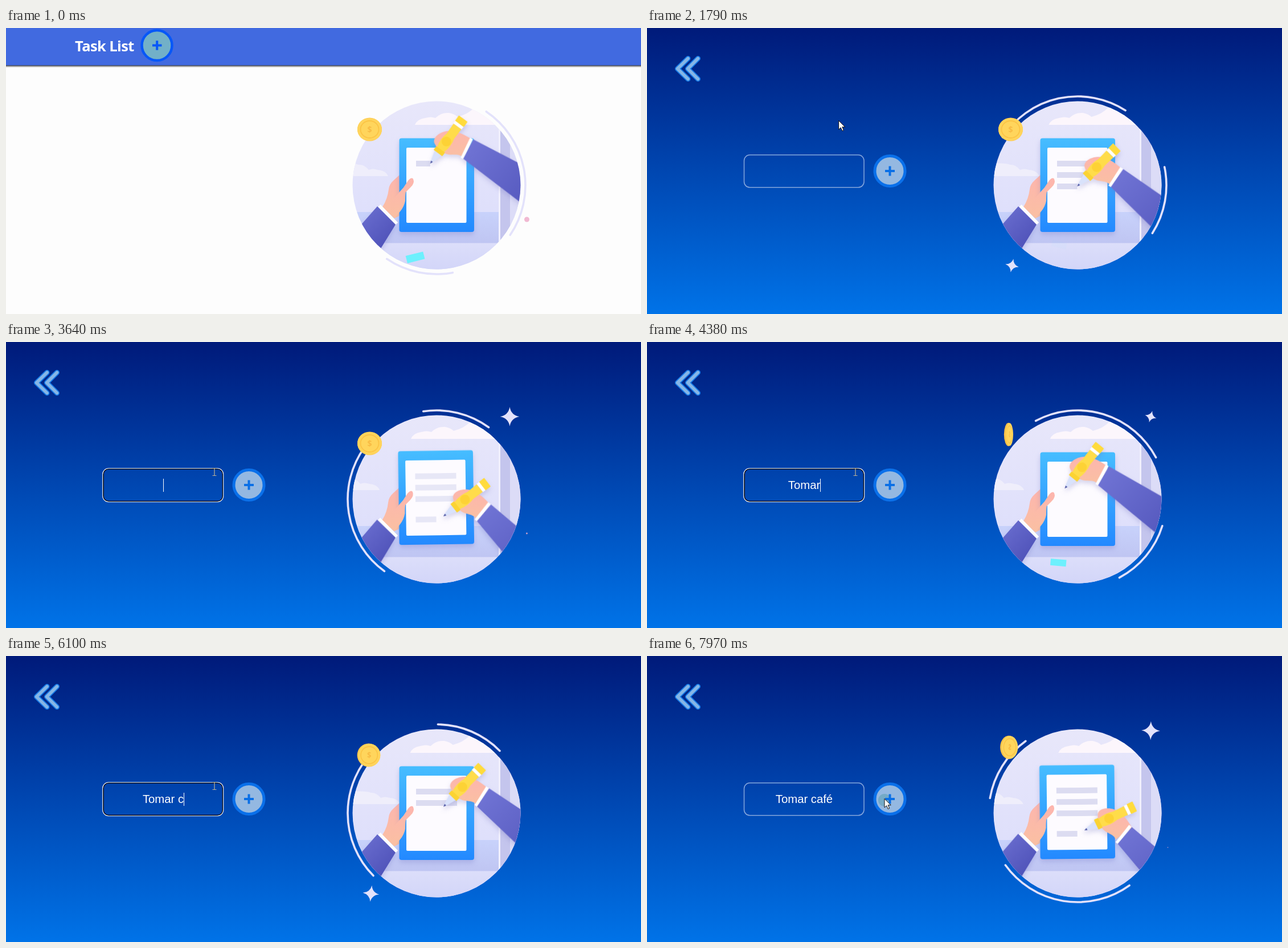
These frames come from a looping animation (1115x502 px, 8 s). An HTML page:

```html
<!DOCTYPE html>
<html lang="en">
<head>
<meta charset="utf-8">
<title>Task List</title>
<style>
html, body { margin: 0; width: 100%; height: 100%; overflow: hidden; background: #fdfdfd; }
svg { position: absolute; left: 0; top: 0; display: block; }
#entry {
  position: absolute; left: 170px; top: 222px; width: 212px; height: 58px;
  display: flex; align-items: center; justify-content: center;
  font: 20.3px "Liberation Sans", Arial, sans-serif; color: #fff; white-space: pre;
}
#typed { position: relative; height: 23px; line-height: 23px; }
#caret { position: absolute; right: -1px; top: 0; width: 1px; height: 23px; background: #fff; }
.title { font: 700 25.5px "Open Sans", "Noto Sans", sans-serif; letter-spacing: -.6px; fill: #fff; }
.coin-sign { font: 700 14px "Open Sans", sans-serif; fill: #f8bb44; text-anchor: middle; }
.ring { fill: none; stroke: #e3e2fb; stroke-width: 3.6; stroke-linecap: round; }
.soft { filter: drop-shadow(0 5px 4px rgba(110, 110, 190, .28)); }
</style>
</head>
<body>
<svg width="1115" height="502" viewBox="0 0 1115 502">
  <defs>
    <linearGradient id="night" x2="0" y2="1"><stop stop-color="#001a7a"/><stop offset="1" stop-color="#0073e8"/></linearGradient>
    <linearGradient id="sky" x2="0" y2="1"><stop stop-color="#e8e7fa"/><stop offset="1" stop-color="#dadcfc"/></linearGradient>
    <linearGradient id="floor" x2="0" y2="1"><stop stop-color="#c8d2fb"/><stop offset="1" stop-color="#bfc5f2"/></linearGradient>
    <linearGradient id="desk" x2="0" y2="1"><stop stop-color="#dcdefa"/><stop offset="1" stop-color="#d0d3f8"/></linearGradient>
    <linearGradient id="frame" x2="0" y2="1"><stop stop-color="#46bdff"/><stop offset="1" stop-color="#2389ff"/></linearGradient>
    <linearGradient id="cloth" x2="1" y2="1"><stop stop-color="#7276d6"/><stop offset="1" stop-color="#474ab2"/></linearGradient>
    <linearGradient id="skin" x2="0" y2="1"><stop stop-color="#fdb5ae"/><stop offset="1" stop-color="#fac0a2"/></linearGradient>
    <clipPath id="disc"><circle cx="756" cy="276" r="147.5"/></clipPath>
    <filter id="blur" x="-5%" y="-50%" width="110%" height="200%"><feGaussianBlur stdDeviation="1.6"/></filter>
    <path id="star" d="M0-17Q2.5-2.5 17 0Q2.5 2.5 0 17Q-2.5 2.5-17 0Q-2.5-2.5 0-17Z" fill="#e3e2fb"/>
    <path id="chevrons" d="M72 53.5L53.5 71.5 72 89.5M89.5 53.5L71.5 71.5 89.5 89.5"/>
  </defs>

  <g id="home">
    <rect width="1115" height="502" fill="#fdfdfd"/>
    <rect x="-9" y="40" width="1133" height="27" opacity=".9" filter="url(#blur)"/>
    <rect width="1115" height="65.5" fill="#416ae0"/>
    <text class="title" x="121" y="41">Task List</text>
    <circle cx="265" cy="30.5" r="26.5" fill="#72b0c8" stroke="#0757f8" stroke-width="4.5"/>
    <path d="M257 30.5h16.5M265.2 22.3v16.5" stroke="#0757f8" stroke-width="4"/>
  </g>

  <g id="form">
    <rect width="1115" height="502" fill="url(#night)"/>
    <g fill="none" stroke-linecap="round" stroke-linejoin="round">
      <use href="#chevrons" stroke="#1479e8" stroke-width="9"/>
      <use href="#chevrons" stroke="#86b6e6" stroke-width="5.6"/>
    </g>
    <rect id="idle" x="170.5" y="222.8" width="210.5" height="57" rx="10" fill="none" stroke="#86a6dc" stroke-width="1.5"/>
    <g id="focus" fill="none">
      <rect x="171" y="223" width="209.6" height="56.6" rx="9" stroke="#04060f" stroke-width="1.7"/>
      <rect x="169.7" y="221.7" width="212" height="59" rx="10.5" stroke="#f4f6fb" stroke-width="1.1"/>
    </g>
    <circle cx="426.5" cy="251" r="26.5" fill="#94b8e1" stroke="#0a70ea" stroke-width="5"/>
    <circle id="tap" cx="417" cy="253" r="11" fill="#6aa6bd" opacity=".75"/>
    <path d="M418 251h17M426.5 242.5v17" stroke="#0a6fe6" stroke-width="4"/>
  </g>

  <g id="art">
    <path id="longArc" class="ring"/>
    <path id="shortArc" class="ring"/>
    <g clip-path="url(#disc)">
      <circle cx="756" cy="276" r="149" fill="url(#sky)"/>
      <path id="cloudTop" d="M0 170Q4 160 18 158Q28 155 36 158Q46 148 60 149Q70 151 75 156Q94 151 104 140H160V170Z" fill="#fcf6fc"/>
      <path id="cloudLeft" d="M0 260Q-4 250-18 249Q-27 246-34 249Q-42 239-52 240Q-58 236-110 238V260Z" fill="#efeefb"/>
      <rect x="600" y="323" width="266" height="55" fill="url(#floor)"/>
      <rect x="868" y="128" width="17" height="250" fill="#c4c5ed"/>
      <rect x="885" y="128" width="25" height="250" fill="#dcdcf7"/>
      <rect x="865" y="128" width="3" height="250" fill="#f1f0fd"/>
      <rect x="600" y="377.5" width="310" height="60" fill="url(#desk)"/>

      <g id="tablet">
        <path d="M661 314Q670 300 672 283Q673 274 681 267L692 257 712 300 690 330 682 334Z" fill="url(#skin)"/>
        <rect class="soft" x="690.5" y="193.5" width="131.5" height="164.5" rx="4" fill="url(#frame)"/>
        <rect x="703" y="210" width="105.5" height="132" rx="2" fill="#fdfbff"/>
        <g id="lines" fill="#dcdcf1"></g>
        <path d="M680 300L698 280 706 268Q712 261 715 265Q718 272 711 279L702 288Q701 293 701 303Q699 314 692 322L682 334 665 318Z" fill="url(#skin)"/>
        <path d="M655.5 312L686 343.5" stroke="#fff" stroke-width="6"/>
        <path class="soft" d="M652 313L684 345 650 400 600 372Z" fill="url(#cloth)"/>
      </g>

      <g id="hand" class="soft">
        <path d="M77-34C62-46 48-54 35-53C20-52 9-43 12-34C16-22 28-12 38-11C48-10 52-10 57-5Z" fill="url(#skin)"/>
        <g transform="rotate(-46.6)">
          <path d="M2-1.5L24-7.5V7.5L2 1.5Z" fill="#d9e2fb"/>
          <path d="M0 0L5-2V2Z" fill="#4c53a0"/>
          <path d="M30-7.5Q46-12 60-8L81-8.5V8.5L60 8Q46 12 30 7.5Z" fill="#ffdc4a"/>
          <rect x="23" y="-9.5" width="8" height="19" rx="1" fill="#fbd332"/>
          <circle cx="48" r="8.5" fill="#fdd235"/>
          <rect x="81" y="-9" width="6" height="18" fill="#fff"/>
          <rect x="86.5" y="-9.5" width="11.5" height="19" rx="1" fill="#ffdb3c"/>
        </g>
        <g id="sleeve">
          <path d="M77-35L57-2" stroke="#fff" stroke-width="5.5"/>
          <path d="M80-33L59-1 210 140 230 65Z" fill="url(#cloth)"/>
        </g>
      </g>
    </g>
    <rect id="slip" x="-16.5" y="-7" width="33" height="14" fill="#6df0fd"/>
    <circle id="dot" cx="914.5" cy="336" fill="#efaecb" opacity=".86"/>
    <use id="starTop" href="#star"/>
    <use id="starLow" href="#star"/>
    <g id="coin">
      <ellipse id="edge" ry="20.5" fill="#fdc349"/>
      <g id="face">
        <ellipse rx="21.5" ry="20" fill="#ffd45c"/>
        <ellipse rx="16" ry="15" fill="#ffd55c" stroke="#fbc445" stroke-width="1.8"/>
        <text class="coin-sign" y="5">$</text>
      </g>
    </g>
  </g>
</svg>

<div id="entry"><span id="typed"><span id="text"></span><span id="caret"></span></span></div>

<svg id="pointer" width="1115" height="502" viewBox="0 0 1115 502">
  <path id="arrow" d="M0 0V15.5L3.6 12.2 6.2 18 8.7 16.9 6.2 11.2H11.2Z" fill="#fff" stroke="#111"/>
  <path id="finger" d="M-1.5 10V1.5Q0-1 2 1.5V7.5Q4 6 5 8Q7 7 8 9Q10.5 8.5 10.5 11V15Q10 18 8.5 20H1Q-1 16-4 13Q-5.5 10.5-3.5 10Q-2.5 10-1.5 11.5Z" fill="#fff" stroke="#111"/>
  <path id="beam" d="M-3.5-6.5H-1Q0-6.5 0-5.5Q0-6.5 1-6.5H3.5M0-5.5V5.5M-3.5 6.5H-1Q0 6.5 0 5.5Q0 6.5 1 6.5H3.5" fill="none" stroke="#b9b096" stroke-width="1.2"/>
</svg>

<script>
const LOOP = 8000, CYCLE = 4800, HALF = CYCLE / 2, LEAD = 165;
const SWITCH = 1300, FOCUS = 2300, BLUR = 7900;
// Writing: a line begins every STEP and takes DRAW at full width.
const STEP = 860, DRAW = 480, LEFT = 720, WIDTHS = [72, 72, 72, 36];
const HOPS = [952, 2987, 4160], HOP = 550;
const PULSES = [105, 1975, 3325], PULSE = 500;

const $ = id => document.getElementById(id);
const show = (id, on) => { $(id).style.display = on ? '' : 'none'; };
const move = (id, value) => $(id).setAttribute('transform', value);
const part = (t, from, to) => Math.max(0, Math.min(1, (t - from) / (to - from)));
const smooth = u => u * u * (3 - 2 * u);
const mix = (a, b, u) => a.map((v, i) => v + (b[i] - v) * u);
const glide = (a, b, t, from, to) => mix(a, b, smooth(part(t, from, to)));
const wave = (p, period, peak) => Math.cos(2 * Math.PI * (p - peak) / period);
const hump = u => Math.sin(Math.PI * u);
const plateau = (p, from, to, edge) => part(p, from, from + edge) * part(p, to, to - edge);

const lineY = i => 238 + 20 * i + (i === 3 ? 16 : 0);
const lineEnd = i => i * STEP + DRAW * WIDTHS[i] / WIDTHS[0];

const bars = WIDTHS.map((_, i) => {
  const bar = document.createElementNS('http://www.w3.org/2000/svg', 'rect');
  bar.setAttribute('x', LEFT);
  bar.setAttribute('y', lineY(i) - 5);
  bar.setAttribute('height', 10);
  return $('lines').appendChild(bar);
});

function penTip(p) {
  const i = Math.min(3, Math.floor(p / STEP)), end = lineEnd(i);
  const start = [LEFT, lineY(i)], stop = [LEFT + WIDTHS[i], lineY(i)];
  if (p < end) return mix(start, stop, part(p, i * STEP, end));
  if (i < 3) return mix(stop, [LEFT, lineY(i + 1)], part(p, end, (i + 1) * STEP));
  const rest = glide(stop, [768, 306], p, 2950, 3335);
  return mix(rest, [LEFT, lineY(0)], part(p, 3900, CYCLE));
}

function arc(id, from, to) {
  const at = deg => {
    const a = deg * Math.PI / 180;
    return `${756 + 156 * Math.cos(a)} ${276 + 156 * Math.sin(a)}`;
  };
  $(id).setAttribute('d', `M${at(from)}A156 156 0 0 1 ${at(to)}`);
}

function drawHands(p) {
  const [x, y] = penTip(p);
  const sway = (y - 260) * .2 + (x - 755) * .1 - 1.7;
  const tilt = sway + 13 * hump(part(p, 3100, 3700));
  move('hand', `translate(${x} ${y}) rotate(${tilt})`);
  move('sleeve', `rotate(${sway * .8 - tilt} 69 -17)`);

  bars.forEach((bar, i) => bar.setAttribute('width', WIDTHS[i] * part(p, i * STEP, lineEnd(i))));
  $('lines').setAttribute('opacity', 1 - part(p, 3700, 4000));
  const lift = plateau(p, 3150, 4150, 250);
  move('tablet', `translate(${-lift} ${-2.7 * lift}) rotate(${-.8 * lift} 756 276)`);
}

function drawStar(id, x, y, k) {
  move(id, `translate(${x} ${y}) rotate(${40 * (1 - k)}) scale(${k})`);
}

function drawCoin(p) {
  const start = HOPS.find(h => p >= h && p < h + HOP);
  const u = start === undefined ? 0 : (p - start) / HOP;
  const turn = wave(u, 1, 0), side = Math.sqrt(1 - turn * turn);
  move('coin', `translate(${638.5 - 3 * side} ${178 - 19.5 * hump(u)})`);
  move('face', `translate(${side} 0) scale(${turn} 1)`);
  $('edge').setAttribute('rx', 21.5 * Math.abs(turn) + 1.5 * side);
  move('edge', `translate(${-side} 0)`);
}

function drawArt(t) {
  const p = (t + LEAD) % CYCLE;
  drawHands(p);
  drawCoin(p);

  const a = .15 * t - 58.3 + 3.2 * wave(p, HALF, 2250);
  arc('longArc', a, a + 90);
  arc('shortArc', a + 135.5, a + 180);
  move('cloudTop', `translate(${715 + 10 * wave(p, HALF, 650)} 0)`);
  move('cloudLeft', `translate(${674 + 18 * wave(p, CYCLE, 1500)} 0)`);

  const fall = (p + HALF - 1950) % HALF / 1250;
  move('slip', `translate(${724 - 11 * fall} ${380 + 46 * fall}) rotate(${14 - 57 * fall}) scale(${.78 + .35 * fall})`);
  $('slip').setAttribute('opacity', plateau(fall, 0, 1, .14));

  drawStar('starTop', 884.5, 131, plateau(p, 2950, 4790, 400));
  drawStar('starLow', 641, 417, .85 * plateau(p, 650, 2290, 400));
  const grow = Math.max(...PULSES.map(s => hump(part(p, s, s + PULSE))));
  $('dot').setAttribute('r', 12 * Math.max(0, grow));
}

// start, gap between keys, text
const bursts = [[3900, 115, 'Tomar'], [4700, 0, ' '], [6000, 225, 'café']];
const keys = bursts.flatMap(([start, gap, word]) => [...word].map((key, i) => ({ key, at: start + i * gap })));

function drawPointer(t) {
  const button = [282, 41], field = [366, 228];
  const [x, y] = t < SWITCH ? glide([980, 457], button, t, 70, 930)
    : t < BLUR - 900 ? glide(button, field, t, 1400, 2050)
    : glide(field, [417, 250.5], t, 7500, 7780);
  const kind = t >= 890 && t < SWITCH ? 'finger' : t >= SWITCH && y > 221 && x < 383 ? 'beam' : 'arrow';
  show('pointer', t >= 70);
  for (const id of ['arrow', 'finger', 'beam']) show(id, id === kind);
  move(kind, `translate(${x} ${y})`);
}

function drawPage(t) {
  const onForm = t >= SWITCH, focused = t >= FOCUS && t < BLUR;
  show('home', !onForm);
  show('form', onForm);
  show('entry', onForm);
  show('focus', focused);
  show('idle', !focused);
  show('tap', t >= BLUR - 60);

  const done = keys.filter(k => t >= k.at);
  $('text').textContent = done.map(k => k.key).join('');
  const last = done.length ? done[done.length - 1].at : FOCUS;
  show('caret', focused && (t - last) % 1000 < 500);
}

function tick() {
  const t = performance.now() % LOOP;
  drawPage(t);
  drawPointer(t);
  drawArt(t);
  requestAnimationFrame(tick);
}
tick();
</script>
</body>
</html>
```
